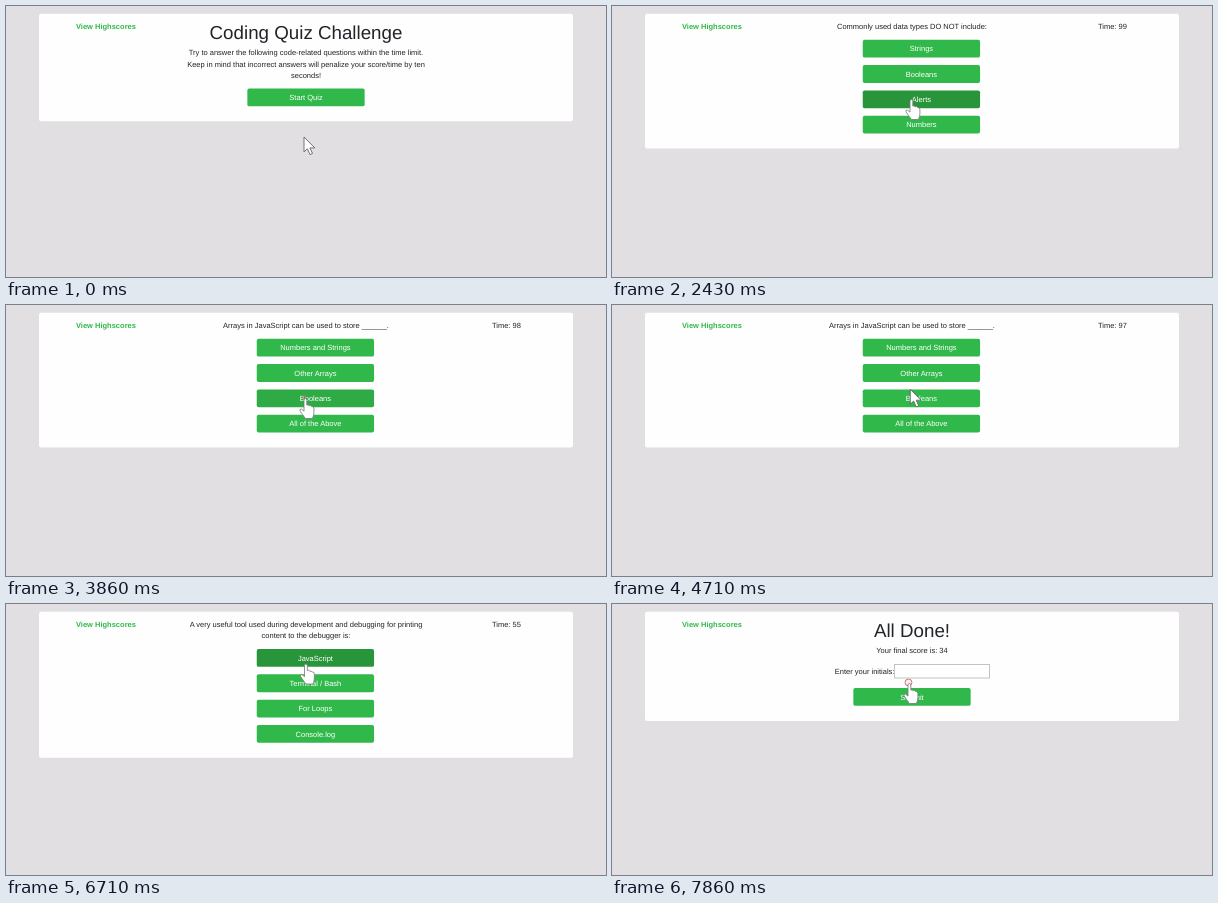
An HTML page for the animation above (8 s loop, 600 px wide and 271 px high).

```html
<!DOCTYPE html>
<html lang="en">
<head>
<meta charset="utf-8">
<title>Coding Quiz</title>
<style>
  html, body { margin: 0; width: 100%; height: 100%; overflow: hidden; background: #e1dfe1; }
  svg { display: block; width: 600px; height: 271px; }
  text { font: 7.5px "Liberation Sans", Arial, sans-serif; fill: #212529; text-rendering: geometricPrecision; }
  .mid { text-anchor: middle; }
  .title { font-size: 18.75px; }
  .link { font-weight: bold; fill: #31b84a; }
  .label { fill: #fff; }
  .cursor { fill: #fff; stroke: #55555c; stroke-width: .8; stroke-linejoin: round; }
  #hand { stroke: #77777d; }
  #ring { fill: rgba(230, 120, 130, .12); stroke: #d4747c; stroke-width: 1; }
</style>
</head>
<body>
<svg id="stage" viewBox="0 0 600 271">
  <rect id="card" x="33" y="7.7" width="534" rx="2" fill="#fefefe"/>
  <text class="link" x="70" y="23.1">View Highscores</text>
  <g id="screens"></g>
  <text id="time" class="mid" x="500.4" y="23.1"></text>
  <circle id="ring"/>
  <path id="arrow" class="cursor" d="M0 0V14.8L3.4 11.8L6 17.6L8.5 16.5L5.9 10.9H10.8Z"/>
  <path id="hand" class="cursor" d="M0 1.6Q0 0 1.4 0T2.8 1.6V6.6Q4.2 5.8 5.2 7.2Q6.8 6.4 7.6 8Q9.8 7.6 9.9 10V14Q9.9 17 8.4 20H1.4Q-1.5 16 -4 12.4Q-4.6 10.4 -2.6 10.5L0 12.6Z"/>
</svg>
<script>
const LOOP = 8000, FPS = 7, GREEN = [49, 184, 74], DARK = [41, 149, 58];
const BTN_W = 117.3, BTN_H = 17.8, LINE = 11.25;
const $ = id => document.getElementById(id);

function add(parent, tag, attrs, text = '') {
  const el = document.createElementNS('http://www.w3.org/2000/svg', tag);
  for (const key in attrs) el.setAttribute(key, attrs[key]);
  el.textContent = text;
  parent.append(el);
  return el;
}

function screen(start, bottom, quiz = false) {
  return { start, bottom, quiz, buttons: [], g: add($('screens'), 'g', {}) };
}

function lines(s, y, rows) {
  rows.forEach((row, i) => add(s.g, 'text', { class: 'mid', x: 300, y: y + i * LINE }, row));
}

function title(s, label) {
  add(s.g, 'text', { class: 'mid title', x: 300, y: 33 }, label);
}

function button(s, cx, y, label) {
  const el = add(s.g, 'rect', { x: cx - BTN_W / 2, y, width: BTN_W, height: BTN_H, rx: 1.9 });
  add(s.g, 'text', { class: 'mid label', x: cx, y: y + 11.6 }, label);
  s.buttons.push({ el, y });
}

function question(start, rows, answers) {
  const shift = (rows.length - 1) * LINE;
  const s = screen(start, 142.5 + shift, true);
  lines(s, 23.1, rows);
  answers.forEach((label, i) => button(s, 309.4, 33.8 + shift + i * 25.3, label));
  return s;
}

const intro = screen(0, 115.3);
title(intro, 'Coding Quiz Challenge');
lines(intro, 49.4, [
  'Try to answer the following code-related questions within the time limit.',
  'Keep in mind that incorrect answers will penalize your score/time by ten',
  'seconds!'
]);
button(intro, 300, 82.5, 'Start Quiz');

const questions = [
  question(1300, ['Commonly used data types DO NOT include:'],
    ['Strings', 'Booleans', 'Alerts', 'Numbers']),
  question(2700, ['The condition in an if / else statement is enclosed within ______.'],
    ['Quotes', 'Curly Brackets', 'Parentheses', 'Square Brackets']),
  question(3800, ['Arrays in JavaScript can be used to store ______.'],
    ['Numbers and Strings', 'Other Arrays', 'Booleans', 'All of the Above']),
  question(5250, ['String values must be enclosed within ______ when being assigned to', 'variables.'],
    ['Commas', 'Curly Brackets', 'Quotes', 'Parentheses']),
  question(6400, ['A very useful tool used during development and debugging for printing', 'content to the debugger is:'],
    ['JavaScript', 'Terminal / Bash', 'For Loops', 'Console.log'])
];

const done = screen(7740, 117);
title(done, 'All Done!');
lines(done, 49.4, ['Your final score is: 34']);
add(done.g, 'text', { x: 222.8, y: 69.7 }, 'Enter your initials:');
add(done.g, 'rect', { x: 282.5, y: 60.5, width: 95, height: 13.5, fill: '#fff', stroke: '#c3c3c6' });
button(done, 300, 84, 'Submit');

const screens = [intro, ...questions, done];
const wrongClicks = [5250, 6400, 7740];

// Pointer moves: from time, to time, end x, end y
const moves = [
  [140, 950, 298, 93.5],
  [4570, 5100, 299.5, 43],
  [5560, 6100, 298.5, 60],
  [7200, 7650, 296, 79.5]
];

function pointer(t) {
  let x = 298, y = 131, last = 0;
  for (const [from, to, ex, ey] of moves) {
    if (t < from) break;
    const p = Math.min(1, (t - from) / (to - from));
    const e = p * p * (3 - 2 * p);
    x += (ex - x) * e;
    y += (ey - y) * e;
    last = Math.min(t, to);
  }
  return { x, y, last };
}

function draw(t) {
  const now = screens.findLast(s => t >= s.start);
  const age = t - now.start;
  const { x, y, last } = pointer(t);

  for (const s of screens) s.g.style.display = s === now ? '' : 'none';
  $('card').setAttribute('height', now.bottom - 7.7);

  let over = false;
  for (const b of now.buttons) {
    const hit = y >= b.y && y <= b.y + BTN_H;
    const k = hit ? Math.min(1, age / 150) : 0;
    b.el.setAttribute('fill', `rgb(${GREEN.map((c, i) => Math.round(c + (DARK[i] - c) * k))})`);
    over = over || hit;
  }

  const ticks = Math.floor((t - questions[0].start) / 1000);
  const penalty = 20 * wrongClicks.filter(c => t >= c).length;
  $('time').textContent = now.quiz ? `Time: ${100 - ticks - penalty}` : '';

  // The hand stays until the pointer moves on the new screen
  const hand = over || (now !== intro && last <= now.start);
  for (const id of ['hand', 'arrow']) {
    $(id).style.display = (id === 'hand') === hand ? '' : 'none';
    $(id).setAttribute('transform', `translate(${x} ${y})`);
  }

  const ring = $('ring');
  ring.style.display = now !== intro && age < 250 ? '' : 'none';
  ring.setAttribute('cx', x + .5);
  ring.setAttribute('cy', y - 1);
  ring.setAttribute('r', age / 34);
}

function loop() {
  const t = performance.now() % LOOP;
  draw(Math.floor(t * FPS / 1000 + .03) * 1000 / FPS % LOOP);
  requestAnimationFrame(loop);
}
loop();
</script>
</body>
</html>
```
